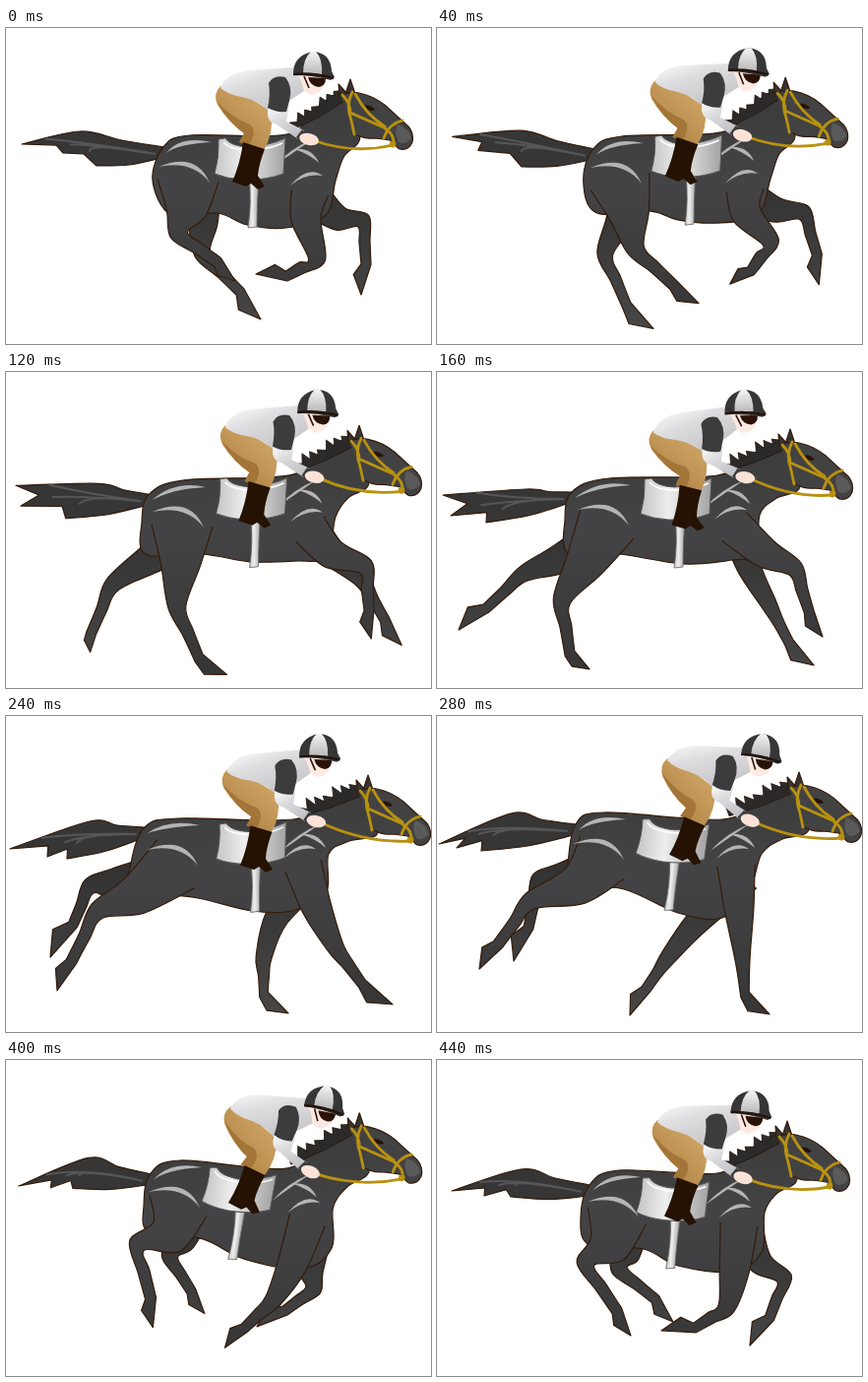
Animation, 432 px wide and 321 px high, one loop 0.48 s. Source, as an HTML page:

```html
<!DOCTYPE html>
<html lang="en">
<head>
<meta charset="utf-8">
<title>Galloping horse</title>
<style>
html, body { margin: 0; width: 100%; height: 100%; overflow: hidden; background: #fff; }
svg { display: block; width: 100vw; height: 100vh; }
.coat { stroke: #351b09; stroke-width: 1.2; stroke-linejoin: round; }
.gold { fill: none; stroke: #b8910f; stroke-width: 2.8; stroke-linecap: round; }
</style>
</head>
<body>
<svg viewBox="0 0 432 321">
  <defs>
    <linearGradient id="coat" gradientUnits="userSpaceOnUse" x1="0" y1="80" x2="0" y2="300">
      <stop offset="0" stop-color="#3c3c3c"/><stop offset=".35" stop-color="#444446"/><stop offset="1" stop-color="#363637"/>
    </linearGradient>
    <linearGradient id="far" gradientUnits="userSpaceOnUse" x1="0" y1="160" x2="0" y2="300">
      <stop offset="0" stop-color="#333"/><stop offset="1" stop-color="#464647"/>
    </linearGradient>
    <linearGradient id="leather">
      <stop offset="0" stop-color="#c4c4c4"/><stop offset=".4" stop-color="#eee"/><stop offset="1" stop-color="#a2a2a2"/>
    </linearGradient>
    <linearGradient id="shirt" x1="0" y1="0" x2=".6" y2="1">
      <stop offset="0" stop-color="#fff"/><stop offset=".4" stop-color="#dedee0"/><stop offset="1" stop-color="#c2c2c6"/>
    </linearGradient>
    <linearGradient id="tan" x1="0" y1="1" x2=".8" y2="0">
      <stop offset="0" stop-color="#a87a3b"/><stop offset="1" stop-color="#d3aa6b"/>
    </linearGradient>
    <linearGradient id="stripe" x1="0" y1="0" x2="0" y2="1">
      <stop offset="0" stop-color="#f4f4f4"/><stop offset="1" stop-color="#b9b9b9"/>
    </linearGradient>
  </defs>
  <path id="tail" class="coat" fill="#363637"/>
  <path id="hair" fill="none" stroke="#565658" stroke-width="2"/>
  <path id="hindFar" class="coat" fill="url(#far)"/>
  <path id="foreFar" class="coat" fill="url(#far)"/>
  <path id="body" class="coat" fill="url(#coat)"/>
  <path id="mane" fill="#2c2a29" stroke="#24150c" stroke-width=".8"/>
  <g id="head">
    <path class="coat" fill="#343434" d="M339 70L338 57L346 66M345 67L350 52L355 67"/>
    <path class="coat" fill="#424243" d="M340 68Q350 64 359 66Q374 69 386 79Q400 92 409 100Q415 107 413 116Q409 125 400 123Q396 121 394 115Q386 113 374 112Q364 113 356 108"/>
    <path fill="#5a5a5b" d="M398 98Q410 102 412 112Q406 119 399 116Q394 106 398 98Z"/>
    <path fill="#261207" d="M363 79Q370 77 375 83Q369 86 363 79Z"/>
    <path class="gold" d="M352 65Q345 78 351 94L354 108M342 68Q350 76 350 86L386 102M355 67Q366 88 385 100M403 94Q389 97 384 112M386 103Q395 108 394 119"/>
    <circle class="gold" cx="393" cy="118" r="2"/>
  </g>
  <path id="hind" class="coat" fill="url(#coat)"/>
  <path id="fore" class="coat" fill="url(#coat)"/>
  <path id="shine" fill="#b4b4b5"/>
  <g id="saddle">
    <path fill="url(#leather)" stroke="#666" stroke-width=".8" d="M31 38L41 38Q39 66 39 89L30 90Q34 64 31 38Z"/>
    <path fill="url(#leather)" stroke="#555" stroke-width="1" d="M0 0L7 -1Q12 7 30 8Q50 7 68 -1L66 35Q48 42 24 41Q8 40 -4 35Q1 18 0 0Z"/>
    <path fill="none" stroke="#fff" stroke-width="1.5" d="M5 3Q12 11 31 11Q50 11 65 4"/>
  </g>
  <path id="rein" class="gold"/>
  <g id="rider">
    <path fill="url(#tan)" d="M218 59Q210 67 215 78Q226 96 242 107L237 116L262 124Q272 108 270 85L240 66Z"/>
    <path fill="#a37538" d="M214 74Q230 92 248 98Q256 105 247 119L237 116L242 107Q226 96 214 74Z"/>
    <path fill="#251203" d="M241 116L263 123Q257 138 256 150L263 161L256 164L249 158L244 161L230 156Q238 138 241 116Z"/>
    <path fill="#fde9e1" d="M294 46L300 62L309 68Q321 67 323 58L322 48Z"/>
    <path fill="url(#shirt)" d="M218 61Q224 45 247 43L292 40Q300 50 303 64L288 74L269 88Q262 75 240 70Q226 68 218 61Z"/>
    <path fill="url(#shirt)" d="M267 80Q263 95 275 98L297 113L303 104L285 95L288 80Z"/>
    <path fill="#3c3c3d" d="M267 56Q272 47 284 50Q292 60 288 74L285 85Q274 86 266 81Q269 68 267 56ZM295 111L301 103L304 106L298 114Z"/>
    <ellipse fill="#fde2d8" cx="308" cy="113" rx="10" ry="6" transform="rotate(14 308 113)"/>
    <path fill="#2a1208" d="M307 50L325 51Q325 59 318 60Q309 59 307 50Z"/>
    <path fill="none" stroke="#2a1208" stroke-width="1.6" d="M303 49L308 61"/>
    <path fill="#363637" d="M292 48Q291 28 312 24Q330 25 331 44L334 50L330 53Q312 48 292 48Z"/>
    <path fill="url(#stripe)" d="M302 46Q302 31 310 24L315 24Q322 31 321 47Z"/>
    <path fill="none" stroke="#23130c" stroke-width="2.4" d="M292 47Q312 45 333 51"/>
  </g>
</svg>
<script>
const LOOP = 480, STEP = 40;
const KEYS = [0, 80, 160, 240, 280, 360, 440];

// One row per key pose, x and y pairs
const trunk = [
  [149,155, 160,121, 187,109, 285,108, 335,155, 325,190, 285,203, 245,200, 215,188, 168,190],
  [146,155, 155,125, 187,111, 292,105, 341,150, 327,190, 285,195, 245,192, 215,185, 152,185],
  [130,150, 137,122, 175,108, 285,105, 328,145, 325,185, 300,191, 250,195, 185,185, 134,185],
  [127,150, 141,113, 175,104, 292,105, 328,140, 325,180, 290,198, 250,198, 195,185, 130,175],
  [133,150, 141,110, 170,98, 290,105, 330,140, 318,175, 290,205, 245,200, 190,176, 132,170],
  [135,135, 140,105, 170,93, 282,105, 332,145, 330,185, 300,207, 240,195, 190,172, 138,165],
  [146,160, 155,127, 185,112, 285,115, 333,155, 330,195, 300,215, 245,209, 210,192, 155,188]
];
const tail = [
  [16,118, 75,105, 58,127, 92,140],
  [14,108, 95,106, 24,126, 75,143],
  [6,125, 90,119, 14,146, 50,153],
  [4,135, 85,107, 42,143, 62,145],
  [2,130, 75,99, 20,134, 45,137],
  [10,122, 80,89, 42,122, 62,124],
  [15,133, 85,111, 48,138, 75,139]
];
// Upper leg, hock or knee, fetlock, toe
const legs = {
  hind: [
    [183,188, 176,210, 215,238, 233,257],
    [200,195, 212,238, 245,285, 276,304],
    [150,195, 127,232, 135,286, 155,302],
    [130,183, 93,198, 66,250, 52,279],
    [140,173, 95,188, 62,232, 43,257],
    [155,168, 118,173, 113,228, 104,260],
    [173,192, 151,207, 183,255, 197,280]
  ],
  hindFar: [
    [200,200, 200,230, 238,268, 259,296],
    [168,190, 136,224, 138,285, 164,304],
    [125,190, 88,205, 50,240, 22,262],
    [110,170, 85,173, 68,212, 45,245],
    [128,164, 103,167, 93,215, 78,249],
    [160,172, 146,188, 153,230, 160,254],
    [190,200, 186,214, 222,243, 240,266]
  ],
  fore: [
    [305,195, 316,235, 285,252, 254,250],
    [325,188, 358,204, 350,245, 340,273],
    [335,185, 364,200, 378,243, 392,269],
    [316,195, 335,235, 362,272, 393,293],
    [307,195, 310,240, 313,283, 338,303],
    [283,200, 260,235, 238,270, 234,304],
    [302,215, 294,252, 262,272, 228,275]
  ],
  foreFar: [
    [340,194, 363,196, 366,240, 361,271],
    [350,182, 376,190, 396,230, 404,259],
    [318,200, 337,235, 358,275, 383,298],
    [275,205, 262,245, 262,283, 287,302],
    [262,212, 235,245, 212,278, 196,304],
    [290,220, 272,240, 235,248, 203,256],
    [330,207, 353,222, 338,262, 318,290]
  ]
};
// Shift of the head
const head = [[0,0], [9,-1], [9,6], [18,8], [18,5], [12,-6], [6,10]];
// Place and angle
const rider = [[312,38,0], [320,32,2], [312,32,-4], [318,32,-1], [330,32,6], [328,34,12], [319,45,3]];
const saddle = [[216,113,0], [224,109,0], [211,109,0], [217,110,-1], [209,105,5], [207,99,9], [209,120,4]];

const $ = id => document.getElementById(id);
const add = (p, x, y) => [p[0] + x, p[1] + y];
const mix = (a, b, k) => [a[0] + (b[0] - a[0]) * k, a[1] + (b[1] - a[1]) * k];
const fmt = p => p[0].toFixed(1) + ' ' + p[1].toFixed(1);
const line = pts => pts.map(p => 'L' + fmt(p)).join('');
const setPath = (id, d) => $(id).setAttribute('d', d);
const place = (id, x, y, turn, rest) =>
  $(id).setAttribute('transform', `translate(${x} ${y}) rotate(${turn}) ${rest}`);

function pairs(row) {
  const out = [];
  for (let i = 0; i < row.length; i += 2) out.push([row[i], row[i + 1]]);
  return out;
}

// Periodic cubic through the key poses
function pose(rows, t) {
  const n = KEYS.length;
  let k = n - 1;
  while (KEYS[k] > t) k--;
  const time = i => KEYS[(i + n) % n] + LOOP * Math.floor(i / n);
  const row = i => rows[(i + n) % n];
  const span = time(k + 1) - time(k), u = (t - time(k)) / span;
  return row(k).map((a, i) => {
    const b = row(k + 1)[i];
    const m = (b - row(k - 1)[i]) / (time(k + 1) - time(k - 1)) * span;
    const w = (row(k + 2)[i] - a) / (time(k + 2) - time(k)) * span;
    const d = b - a;
    return a + u * (m + u * (3 * d - 2 * m - w + u * (m + w - 2 * d)));
  });
}

// Smooth segments that continue from the first point
function curve(pts, closed) {
  const n = pts.length;
  const get = i => closed ? pts[(i + n) % n] : pts[Math.max(0, Math.min(n - 1, i))];
  let d = '';
  for (let i = 0; i < (closed ? n : n - 1); i++) {
    const a = get(i - 1), b = get(i), c = get(i + 1), e = get(i + 2);
    const p = add(b, (c[0] - a[0]) / 6, (c[1] - a[1]) / 6);
    const q = add(c, (b[0] - e[0]) / 6, (b[1] - e[1]) / 6);
    d += `C${fmt(p)} ${fmt(q)} ${fmt(c)}`;
  }
  return d;
}

function limb(root, joints, widths) {
  const [upper, knee, ankle, toe] = joints;
  const pts = [root, upper, knee, mix(knee, ankle, .5), ankle];
  const back = [], front = [];
  pts.forEach((p, i) => {
    const a = pts[i - 1] || p, b = pts[i + 1] || toe;
    const x = b[0] - a[0], y = b[1] - a[1], s = widths[i] / (Math.hypot(x, y) || 1);
    back.push(add(p, -y * s, x * s));
    front.push(add(p, y * s, -x * s));
  });
  const x = toe[0] - ankle[0], y = toe[1] - ankle[1];
  const heel = add(ankle, .39 * x - .35 * y, .35 * x + .39 * y);
  back.reverse();
  return 'M' + fmt(front[0]) + curve(front) + line([toe, heel, back[0]]) + curve(back);
}

function drawTail(t, root) {
  const [tip, top, low, last] = pairs(pose(tail, t));
  const end = add(root, -2, 11);
  const upper = [root, add(mix(root, top, .5), 0, 1), top, tip];
  const under = [last, add(mix(last, end, .5), 0, 3), end];
  const notch = (a, b) => mix(mix(a, b, .65), top, .25);
  setPath('tail', 'M' + fmt(root) + curve(upper) +
    line([notch(tip, low), low, notch(low, last), last]) + curve(under));
  const mid = add(root, -8, 7);
  setPath('hair', [[tip, .3], [low, .35], [last, .3]].map(([p, k]) =>
    `M${fmt(mid)}Q${fmt(mix(top, last, k))} ${fmt(mix(p, top, .4))}`).join(''));
}

function drawMane(poll, base) {
  const n = 7, x = base[0] - poll[0], y = base[1] - poll[1], len = Math.hypot(x, y);
  const pts = [];
  for (let i = 0; i < n; i++) {
    const out = 11 + (i % 3) * 3;
    const at = mix(poll, base, i / n * .9);
    const tip = mix(poll, base, (i + 1.2) / n * .9);
    pts.push(add(at, y / len * -4, x / len * 4), add(tip, -y / len * -out * .3 - 3, x / len * out));
  }
  setPath('mane', 'M' + fmt(add(poll, 6, 4)) + line(pts) + line([mix(poll, base, .9), add(mix(poll, base, .5), 4, 3)]) + 'Z');
}

function drawShine(croup, loin, withers, chest) {
  const blade = (a, c, b, w) =>
    `M${fmt(a)}Q${fmt(c)} ${fmt(b)}Q${fmt(add(c, -w * .4, w))} ${fmt(a)}Z`;
  setPath('shine',
    blade(add(loin, -32, 32), add(loin, 6, 16), add(loin, 20, 48), 9) +
    blade(add(croup, 3, 6), add(loin, -10, 0), add(loin, 22, 7), 9) +
    blade(add(chest, -46, 5), add(chest, -28, -16), add(chest, -13, -5), 8) +
    blade(add(withers, -12, 32), add(withers, 4, 14), add(withers, 27, 5), 9) +
    blade(add(withers, 8, 15), add(withers, 26, 13), add(withers, 33, 29), 7));
}

function draw(t) {
  const body = pairs(pose(trunk, t));
  const [rump, croup, loin, withers, chest, ...belly] = body;
  const [hx, hy] = pose(head, t);
  const poll = [343 + hx, 67 + hy], throat = [360 + hx, 110 + hy];
  const crest = add(mix(withers, poll, .5), -1, -4);
  const neck = add(mix(throat, chest, .5), -4, -2);

  drawTail(t, croup);
  const outline = [rump, croup, loin, withers, crest, poll, throat, neck, chest, ...belly];
  setPath('body', 'M' + fmt(rump) + curve(outline, true) + 'Z');
  drawMane(poll, withers);
  place('head', hx, hy, 0, '');

  const leg = (id, root, widths) => setPath(id, limb(root, pairs(pose(legs[id], t)), widths));
  leg('hindFar', add(loin, 8, 52), [24, 15, 8, 5.5, 5]);
  leg('foreFar', add(chest, -18, 22), [18, 12, 8, 5.5, 5]);
  leg('hind', add(loin, -2, 46), [31, 20, 9, 6, 5.5]);
  leg('fore', add(chest, -26, 12), [19, 15, 8.5, 6, 5]);
  drawShine(croup, loin, withers, chest);

  const [sx, sy, tilt] = pose(saddle, t);
  place('saddle', sx, sy, tilt, '');
  const [rx, ry, lean] = pose(rider, t);
  place('rider', rx, ry, lean, 'translate(-312 -38)');

  const a = lean * Math.PI / 180;
  const hand = [rx - 76 * Math.sin(a), ry + 76 * Math.cos(a)];
  const bit = [393 + hx, 119 + hy];
  setPath('rein', `M${fmt(bit)}Q${fmt(add(mix(bit, hand, .5), 0, 12))} ${fmt(hand)}`);
}

function tick() {
  draw(Math.floor(performance.now() % LOOP / STEP) * STEP);
  requestAnimationFrame(tick);
}
tick();
</script>
</body>
</html>
```
